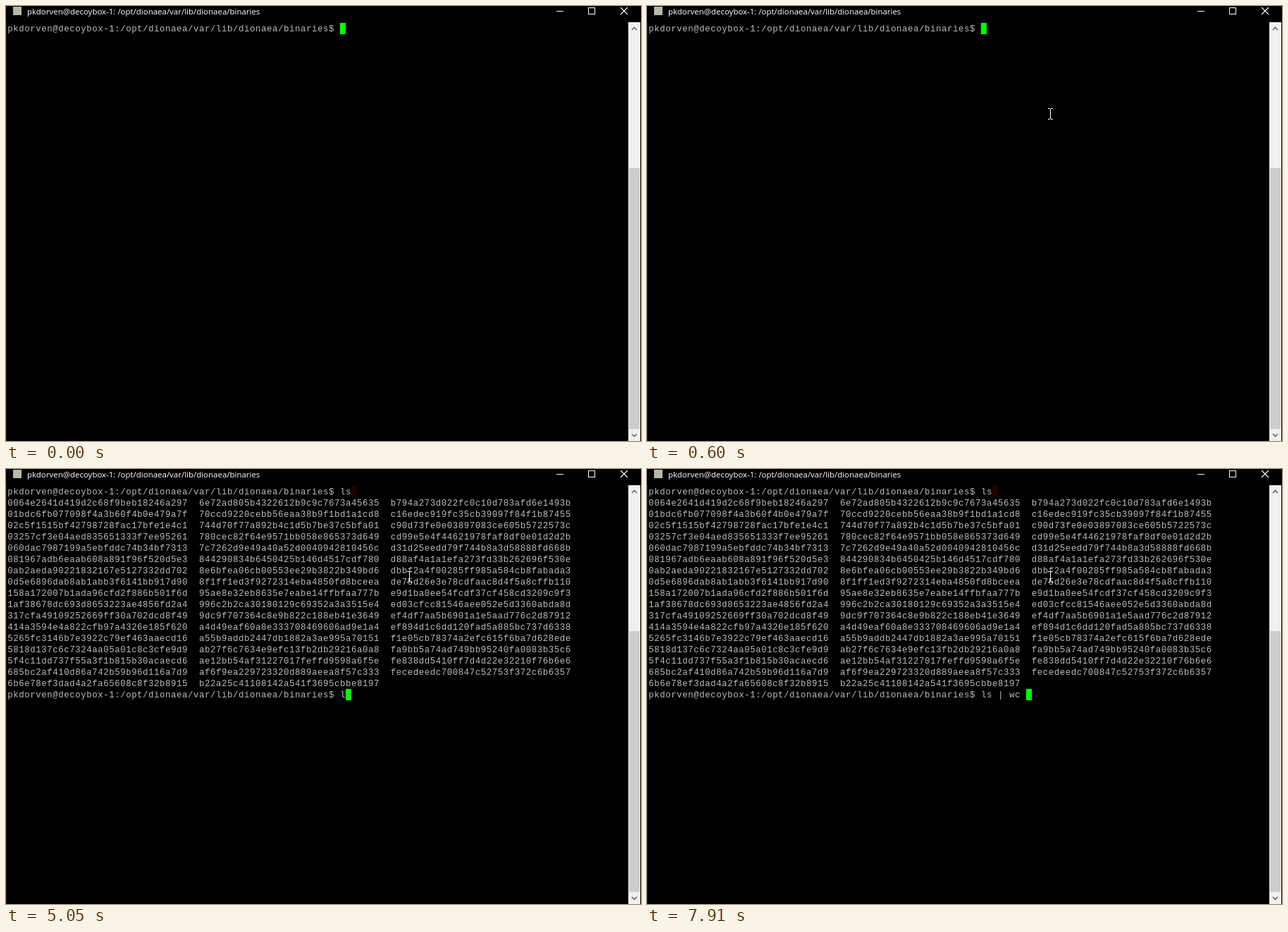
Write an HTML page that moves like this. It is 901 px wide and 617 px high and loops after 8000 ms.

```html
<!DOCTYPE html>
<html lang="en">
<head>
<meta charset="utf-8">
<title>Terminal</title>
<style>
  html, body { margin: 0; width: 100%; height: 100%; overflow: hidden; background: #000; }
  svg { display: block; }
  text { white-space: pre; }
  /* one glyph per 8px cell */
  .term {
    font: 12.4px "Liberation Mono", "Courier New", monospace;
    letter-spacing: calc(8px - 0.6001em);
    fill: #bbb;
  }
  #title { font: 11.47px "Open Sans", "Noto Sans", sans-serif; }
  .crisp { shape-rendering: crispEdges; }
</style>
</head>
<body>
<svg width="901" height="617" viewBox="0 0 901 617">
  <rect width="901" height="617"/>

  <rect id="bar" width="901" height="23"/>
  <rect x="10" y="1" width="12" height="12" fill="#b8b8b0"/>
  <text id="title" x="30" y="12"></text>
  <g id="buttons" fill="none">
    <path class="crisp" d="M781 7.5h10M826.5 2.5h9v9h-9z"/>
    <path d="M872 2l10 10m0-10l-10 10" stroke-width="1.1"/>
  </g>

  <g class="crisp">
    <rect y="23" width="1" height="594" fill="#1c1c1c"/>
    <rect id="edge" x="900" y="122" width="1" height="104" fill="#8a8a8a"/>
    <rect x="883" y="23" width="17" height="594" fill="#f0f0f0"/>
    <rect x="884" y="230" width="15" height="370" fill="#cdcdcd"/>
  </g>
  <path d="M888 34l3.5-3.5 3.5 3.5M888 607l3.5 3.5 3.5-3.5" fill="none" stroke="#7a6450" stroke-width="1.6"/>

  <g id="screen">
    <rect id="trail" class="crisp" x="490" y="24" width="8" height="16" fill="#220000"/>
  </g>
  <rect id="caret" class="crisp" width="8" height="16"/>
  <path id="mouse" class="crisp" d="M-3 -7.5h3m1 0h3M.5 -7v14M-3 7.5h3m1 0h3" fill="none" stroke="#fff"/>
</svg>

<script>
const LOOP = 8000;
const CELL = 8, ROW = 16, LEFT = 2, TOP = 24;
const HOST = "pkdorven@decoybox-1:";
const DIR = "/opt/dionaea/var/lib/dionaea/binaries";
const PROMPT = HOST + DIR + "$ ";

const LISTING = `
0064e2641d419d2c68f9beb18246a297  6e72ad805b4322612b9c9c7673a45635  b794a273d022fc0c10d783afd6e1493b
01bdc6fb077098f4a3b60f4b0e479a7f  70ccd9220cebb56eaa38b9f1bd1a1cd8  c16edec919fc35cb39097f84f1b87455
02c5f1515bf42798728fac17bfe1e4c1  744d70f77a892b4c1d5b7be37c5bfa01  c90d73fe0e03897083ce605b5722573c
03257cf3e04aed835651333f7ee95261  780cec82f64e9571bb058e865373d649  cd99e5e4f44621978faf8df0e01d2d2b
060dac7987199a5ebfddc74b34bf7313  7c7262d9e49a40a52d0040942810456c  d31d25eedd79f744b8a3d58888fd668b
081967adb6eaab608a891f96f520d5e3  844290834b6450425b146d4517cdf780  d88af4a1a1efa273fd33b262696f530e
0ab2aeda90221832167e5127332dd702  8e6bfea06cb00553ee29b3822b349bd6  dbbf2a4f00285ff985a584cb8fabada3
0d5e6896dab8ab1abb3f6141bb917d90  8f1ff1ed3f9272314eba4850fd8bceea  de75d26e3e78cdfaac8d4f5a8cffb110
158a172007b1ada96cfd2f886b501f6d  95ae8e32eb8635e7eabe14ffbfaa777b  e9d1ba0ee54fcdf37cf458cd3209c9f3
1af38678dc693d8653223ae4856fd2a4  996c2b2ca30180129c69352a3a3515e4  ed03cfcc81546aee052e5d3360abda8d
317cfa49109252669ff30a702dcd8f49  9dc9f707364c8e9b822c188eb41e3649  ef4df7aa5b6901a1e5aad776c2d87912
414a3594e4a822cfb97a4326e185f620  a4d49eaf60a8e333708469606ad9e1a4  ef894d1c6dd120fad5a885bc737d6338
5265fc3146b7e3922c79ef463aaecd16  a55b9addb2447db1882a3ae995a70151  f1e05cb78374a2efc615f6ba7d628ede
5818d137c6c7324aa05a01c8c3cfe9d9  ab27f6c7634e9efc13fb2db29216a0a8  fa9bb5a74ad749bb95240fa0083b35c6
5f4c11dd737f55a3f1b815b30acaecd6  ae12bb54af31227017feffd9598a6f5e  fe838dd5410ff7d4d22e32210f76b6e6
685bc2af410d86a742b59b96d116a7d9  af6f9ea229723320d889aeea8f57c333  fecedeedc700847c52753f372c6b6357
6b6e78ef3dad4a2fa65608c8f32b8915  b22a25c41108142a541f3695cbbe8197`.trim().split("\n");

// [start ms, value]
const FOCUS = [[0, true], [130, false], [470, true]];
const MOUSE = [[0, null], [270, [540, 470]], [330, [552, 318]], [400, [572, 154]], [600, [572, 153]]];
const LIST_AT = 2200;
const FIRST = [[0, ""], [2000, "l"], [2070, "ls"]];
const SECOND = [[0, ""], [5050, "l"], [5120, "ls"], [5260, "ls "], [5850, "ls |"],
  [5980, "ls | "], [6180, "ls | w"], [6450, "ls | wc"], [7910, "ls | wc "]];

const $ = id => document.getElementById(id);
const at = (steps, t) => steps.findLast(([start]) => start <= t)[1];
const show = (el, on) => el.setAttribute("visibility", on ? "visible" : "hidden");
function set(el, attrs) {
  for (const key in attrs) el.setAttribute(key, attrs[key]);
}

function addLine(row, str = "") {
  const el = document.createElementNS("http://www.w3.org/2000/svg", "text");
  set(el, { class: "term", x: LEFT + 0.25, y: TOP + row * ROW + 12 });
  el.textContent = str;
  return $("screen").appendChild(el);
}

const lastRow = LISTING.length + 1;
const firstLine = addLine(0);
const output = LISTING.map((str, i) => addLine(i + 1, str));
const lastLine = addLine(lastRow);
$("title").textContent = HOST + " " + DIR;

function drawCaret(row, typed, focused, color) {
  const inset = focused ? 0 : 0.5;
  set($("caret"), {
    x: LEFT + (PROMPT.length + typed.length) * CELL + inset,
    y: TOP + row * ROW + inset,
    width: CELL - 2 * inset,
    height: ROW - 2 * inset,
    fill: focused ? color : "none",
    stroke: focused ? "none" : color
  });
}

function render(t) {
  const focused = at(FOCUS, t);
  const listed = t >= LIST_AT;
  const first = at(FIRST, t), second = at(SECOND, t);
  const mouse = at(MOUSE, t);

  set($("bar"), { fill: focused ? "#000" : "#fff" });
  set($("title"), { fill: focused ? "#fff" : "#999" });
  set($("buttons"), { stroke: focused ? "#fff" : "#999" });
  show($("edge"), !focused);

  firstLine.textContent = PROMPT + first;
  lastLine.textContent = PROMPT + second;
  [...output, lastLine, $("trail")].forEach(el => show(el, listed));

  if (listed) drawCaret(lastRow, second, focused, second ? "#0f0" : "#00c800");
  else drawCaret(0, first, focused, "#0f0");

  show($("mouse"), mouse);
  if (mouse) set($("mouse"), { transform: `translate(${mouse})` });
}

const begin = performance.now();
function tick() {
  render((performance.now() - begin) % LOOP);
  requestAnimationFrame(tick);
}
tick();
</script>
</body>
</html>
```
